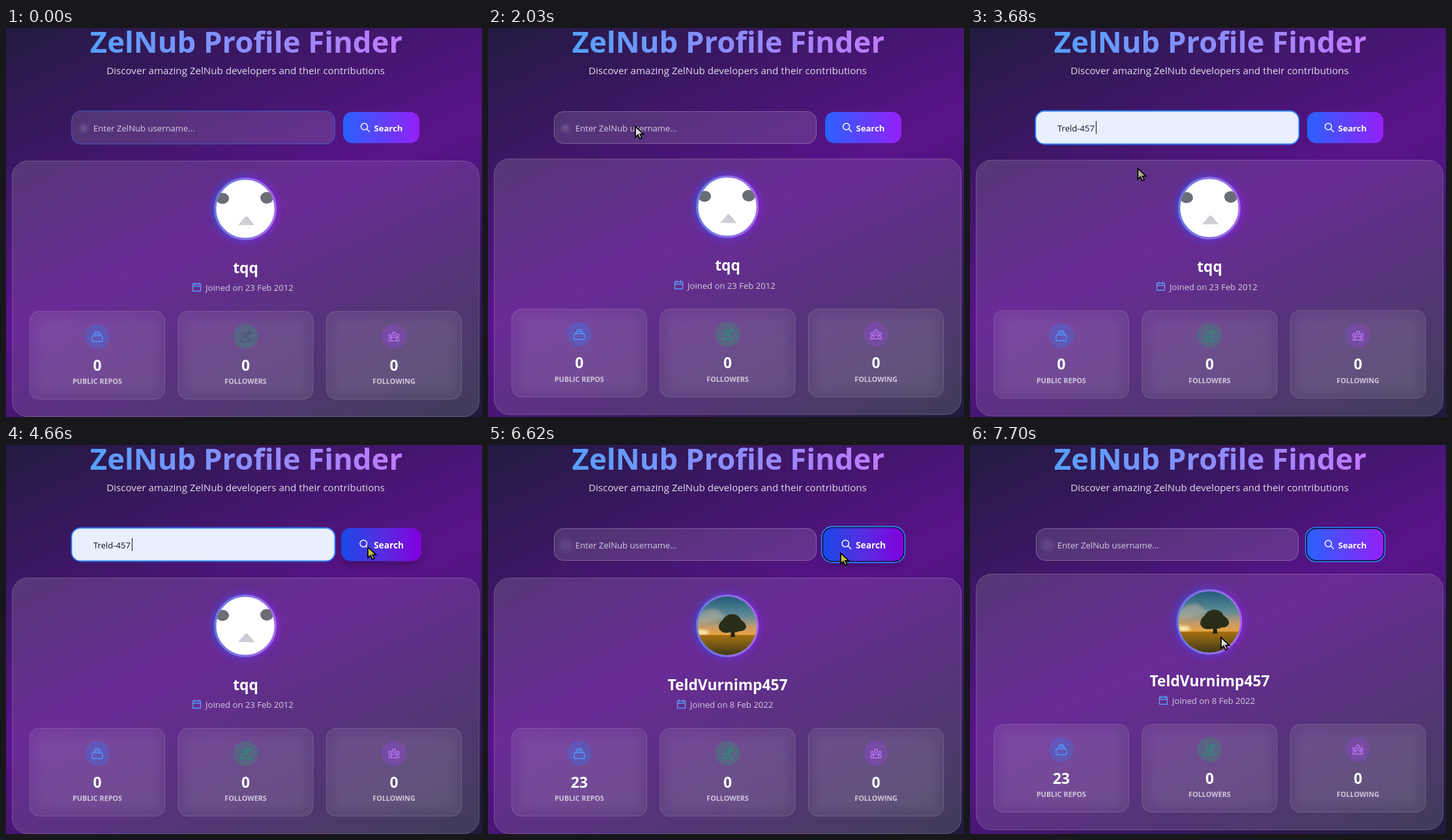
An HTML page for the animation above (8000 ms loop, 730 by 598 pixels).

```html
<!DOCTYPE html>
<html lang="en">
<head>
<meta charset="utf-8">
<title>Profile Finder</title>
<style>
  html, body { margin: 0; width: 100%; height: 100%; overflow: hidden; background: #211b40; }
  svg { display: block; font: 500 13.1px "Open Sans", "Noto Sans", sans-serif; }
  .mid { text-anchor: middle; }
  .bold { font-weight: 700; font-size: 22.8px; fill: #fff; }
  .label { font-weight: 700; font-size: 10.8px; fill: #d2c6dd; }
  .line { fill: none; stroke-linecap: round; stroke-linejoin: round; stroke-width: 1.4; }
</style>
</head>
<body>
<svg width="730" height="598" viewBox="0 0 730 598">
  <defs>
    <linearGradient id="page" gradientUnits="userSpaceOnUse" x2="349" y2="771">
      <stop stop-color="#221b41"/><stop offset=".5" stop-color="#59138b"/><stop offset="1" stop-color="#1f1c3d"/>
    </linearGradient>
    <linearGradient id="glass" gradientUnits="userSpaceOnUse" x2="349" y2="771">
      <stop offset=".2" stop-color="#fff" stop-opacity=".14"/>
      <stop offset=".5" stop-color="#fff" stop-opacity=".1"/>
      <stop offset=".9" stop-color="#fff" stop-opacity=".14"/>
    </linearGradient>
    <linearGradient id="title" gradientUnits="userSpaceOnUse" x1="128" x2="607">
      <stop stop-color="#55a0ff"/><stop offset="1" stop-color="#c07aff"/>
    </linearGradient>
    <linearGradient id="button">
      <stop stop-color="#2962fc"/><stop offset="1" stop-color="#9420f8"/>
    </linearGradient>
    <linearGradient id="buttonHover">
      <stop stop-color="#1a48e6"/><stop offset=".5" stop-color="#562ee2"/><stop offset="1" stop-color="#8200db"/>
    </linearGradient>
    <linearGradient id="ring">
      <stop stop-color="#6a78e0"/><stop offset="1" stop-color="#a468e8"/>
    </linearGradient>
    <linearGradient id="glow">
      <stop stop-color="#2b55f0"/><stop offset="1" stop-color="#9020f0"/>
    </linearGradient>
    <linearGradient id="sky" x2="0" y2="1">
      <stop stop-color="#1f5a78"/><stop offset=".5" stop-color="#5f8c98"/>
      <stop offset=".75" stop-color="#c09a6c"/><stop offset="1" stop-color="#eda23c"/>
    </linearGradient>
    <linearGradient id="field" x2="0" y2="1">
      <stop stop-color="#a8700f"/><stop offset=".4" stop-color="#7d5c16"/><stop offset="1" stop-color="#3c3612"/>
    </linearGradient>
    <filter id="blur" x="-30%" y="-30%" width="160%" height="160%"><feGaussianBlur stdDeviation="6"/></filter>
    <filter id="soft" x="-30%" y="-30%" width="160%" height="160%"><feGaussianBlur stdDeviation="2"/></filter>
    <clipPath id="disc"><circle r="45"/></clipPath>
  </defs>

  <rect width="730" height="598" fill="url(#page)"/>
  <text x="608" y="38" text-anchor="end" font-size="45.4" font-weight="700" fill="url(#title)">ZelNub Profile Finder</text>
  <text class="mid" x="367.5" y="71" font-size="15.15" font-weight="400" fill="#e2daea">Discover amazing ZelNub developers and their contributions</text>

  <rect id="field-box" x="101.5" y="128.5" width="402" height="49" rx="14"/>
  <circle id="blob" cx="119" cy="154" r="6.5" fill="#fff" fill-opacity=".13" filter="url(#soft)"/>
  <text id="entry" x="134" y="159"></text>
  <path id="caret" d="M193.5 143v20" stroke="#111"/>

  <g id="search">
    <rect id="shadow" x="-58" y="-16" width="116" height="48" rx="15" fill="#000" filter="url(#blur)"/>
    <rect id="gap" x="-60" y="-25.5" width="120" height="51" rx="15" fill="#080418"/>
    <rect id="halo" x="-60.8" y="-26.3" width="121.6" height="52.6" rx="16" fill="none" stroke="#2b8cff" stroke-width="1.5"/>
    <rect x="-58.5" y="-24" width="117" height="48" rx="14" fill="url(#button)"/>
    <rect id="dark" x="-58.5" y="-24" width="117" height="48" rx="14" fill="url(#buttonHover)"/>
    <g class="line" stroke="#fff"><circle cx="-26" cy="-1.5" r="5"/><path d="M-22.2 2.2l4.2 4.2"/></g>
    <text x="-11" y="5.5" font-weight="700" fill="#fff">Search</text>
  </g>

  <g id="card">
    <rect x="9.5" y="204.5" width="716" height="393" rx="23.5" fill="url(#glass)" stroke="#fff" stroke-opacity=".22"/>
    <g id="avatar">
      <circle r="50" fill="url(#glow)" filter="url(#blur)" opacity=".75"/>
      <circle r="46.3" fill="#fff" stroke="url(#ring)" stroke-width="3.4"/>
      <g id="face" clip-path="url(#disc)">
        <ellipse cx="-35" cy="-16" rx="10" ry="8.5" fill="#6b6d75"/>
        <ellipse cx="33" cy="-17" rx="10" ry="9" fill="#6b6d75"/>
        <path d="M-11 25L1 11L14 25z" fill="#cfcdd6"/>
        <path d="M1 11L14 25L4 15z" fill="#77747f"/>
      </g>
      <g id="scene" clip-path="url(#disc)">
        <path d="M-46-46h92v62h-92z" fill="url(#sky)"/>
        <path d="M-46-14q12-14 30-12q6 8 16 10q-16 10-46 14z" fill="#c4b39a" opacity=".5" filter="url(#soft)"/>
        <ellipse cx="-40" cy="10" rx="12" ry="4" fill="#ffe9b0" filter="url(#soft)"/>
        <path d="M-46 14h92v32h-92z" fill="url(#field)"/>
        <path d="M5 17l2-14h3l2 14z" fill="#1e2214"/>
        <path d="M-13 4q-1-8 6-13q5-9 14-9q11 0 14 9q8 5 8 11q-3 7-10 6q-8 4-16 2q-11 3-16-6z" fill="#292d18"/>
      </g>
    </g>
    <text id="name" class="mid bold" x="367.5" y="376.5"></text>
    <g id="joined">
      <path class="line" stroke="#5a9bf5" d="M-19.5-10.5h12v11h-12zM-19.5-7h12M-16.5-12.5v3M-10.5-12.5v3"/>
      <text fill="#d5cadf"></text>
    </g>
    <g id="stats"></g>
  </g>

  <g id="popup">
    <path d="M211 188l10-9l10 9z" fill="#1e1b19"/>
    <rect x="201.5" y="188.5" width="153" height="41" rx="5" fill="#35312e" stroke="#1e1b19" stroke-width="3.4"/>
    <text x="212" y="213.5" font-size="11.9" font-weight="600" fill="#eee7e0">Treld-457</text>
    <path class="line" stroke="#ddd6d0" d="M330 205l8 8m0-8l-8 8"/>
  </g>
  <path id="pointer" d="M0 0v16.5l4-3.6l2.8 6l3-1.4l-2.7-5.7h5.4z" stroke="#000" stroke-width="1.7"/>
</svg>

<script>
const $ = id => document.getElementById(id);
const set = (el, attrs) => { for (const k in attrs) el.setAttribute(k, attrs[k]); };
const show = (id, on) => $(id).style.display = on ? '' : 'none';

const icons = [
  ['PUBLIC REPOS', '#2b7fff', '#51a2ff', 'M-7 8h14q1 0 1-1v-5q0-3-3-3h-10q-3 0-3 3v5q0 1 1 1zM-6-1l2-3h8l2 3M-4-4l1-3h6l1 3'],
  ['FOLLOWERS', '#22a06a', '#22997a', 'M-8 8q1-7 7-7q6 0 8 7zM-4-1a3 3 0 1 1 4 1M0 0l7-7M3-7h5M8-3l-4-4'],
  ['FOLLOWING', '#9a40f0', '#c27aff', 'M-4 7q0-6 4-6t4 6zM-2.5-4a2.5 2.5 0 1 0 5 0a2.5 2.5 0 1 0-5 0M-5 7h-3q0-5 4-5M5 7h3q0-5-4-5M-8-1a2 2 0 1 0 4 0a2 2 0 1 0-4 0M4-1a2 2 0 1 0 4 0a2 2 0 1 0-4 0']
];
$('stats').innerHTML = icons.map(([label, tint, color, d], i) => `
  <g transform="translate(${140 + 227.5 * i} 0)">
    <rect x="-103.5" y="435.5" width="207" height="135" rx="14.5" fill="#fff" fill-opacity=".08" stroke="#fff" stroke-opacity=".16"/>
    <rect x="-92" y="447" width="184" height="112" rx="10" fill="#fff" fill-opacity=".05" filter="url(#blur)"/>
    <circle cy="474" r="19" fill="${tint}" fill-opacity=".28"/>
    <path class="line icon" transform="translate(0 474)" stroke="${color}" stroke-opacity=".85" d="${d}"/>
    <text class="mid bold count" y="526.5">0</text>
    <text class="mid label" y="547">${label}</text>
  </g>`).join('');
const greenIcon = document.querySelectorAll('.icon')[1];
const repoCount = document.querySelector('.count');
const joinedText = $('joined').querySelector('text');

// time, x, y, fill of the pointer
const path = [
  [830, 250, 600, '#aaa'], [1050, 285, 400, '#aaa'], [1310, 313, 236, '#aaa'], [1570, 290, 214, '#bbb'],
  [1840, 226, 152, '#ddd'], [2450, 226, 150, '#ddd'], [2700, 255, 216, '#eee'], [3200, 257, 216, '#a8b48c'],
  [3680, 257, 216, '#a8b48c'], [4080, 420, 196, '#c3c743'], [4460, 550, 160, '#c3c743'], [4660, 555, 157, '#c3c743'],
  [4800, 553, 155, '#c3c743'], [5150, 545, 147, '#c3c743'], [5400, 544, 150, '#c3c743'], [6000, 541, 166, '#cdc23e'],
  [6620, 541, 166, '#cdc23e'], [6860, 500, 200, '#ddd'], [7370, 385, 296, '#ddd'], [8000, 385, 296, '#ddd']
];

function draw(t) {
  const ramp = (a, b) => { const k = Math.min(1, Math.max(0, (t - a) / (b - a))); return k * k * (3 - 2 * k); };
  const within = (a, b) => t >= a && t < b;

  // profile card
  const lift = 6 * (ramp(950, 1380) - ramp(1840, 2250) + ramp(3610, 3850) - ramp(4060, 4440) + ramp(6900, 7350));
  const loaded = t >= 5900;
  set($('card'), { transform: `translate(0 ${-lift})` });
  set($('avatar'), { transform: `translate(367 278) scale(${1 + .045 * ramp(7380, 7680)})` });
  show('face', !loaded);
  show('scene', loaded);
  $('name').textContent = loaded ? 'TeldVurnimp457' : 'tqq';
  set($('joined'), { transform: `translate(${loaded ? 310 : 306} 404)` });
  joinedText.textContent = 'Joined on ' + (loaded ? '8 Feb 2022' : '23 Feb 2012');
  repoCount.textContent = loaded ? 23 : 0;
  set(greenIcon, { stroke: t < 830 ? '#465068' : t < 1840 ? '#14ad6e' : '#22997a' });

  // input
  const focused = within(2430, 5350), preview = within(2650, 3230), filled = within(3230, 5900);
  const grow = focused ? 1 : t < 70 ? .7 : 0;
  set($('field-box'), {
    x: 101.5 - grow, y: 128.5 - grow, width: 402 + 2 * grow, height: 49 + 2 * grow,
    fill: filled ? '#e8f0fe' : '#fff', 'fill-opacity': filled ? 1 : focused ? .19 : .12,
    stroke: focused ? '#2b7fff' : t < 70 ? '#3f60c4' : '#fff',
    'stroke-opacity': focused || t < 70 ? 1 : .27, 'stroke-width': focused ? 1.8 : 1
  });
  show('blob', !filled);
  set($('blob'), { r: focused || loaded ? 10 : 6.5, 'fill-opacity': focused || loaded ? .08 : .13 });
  $('entry').textContent = preview || filled ? 'Treld-457' : 'Enter ZelNub username...';
  $('entry').style.cssText = preview ? 'font: 11px "Liberation Sans", Arial, sans-serif' : '';
  set($('entry'), { fill: filled ? '#15151c' : preview ? '#fff' : '#d6cce0' });
  show('caret', within(3350, 5350) && Math.floor((t - 3350) / 530) % 2 === 0);
  show('popup', within(2520, 3290));

  // button
  const hover = ramp(4480, 4650) - ramp(6650, 6850);
  set($('search'), { transform: `translate(575.5 153) scale(${1 + .05 * hover})` });
  set($('dark'), { opacity: hover });
  set($('shadow'), { opacity: .2 * hover });
  show('gap', t >= 5350);
  show('halo', t >= 5350);

  // pointer
  show('pointer', t >= 830);
  const i = path.findIndex(p => p[0] > t);
  if (i > 0) {
    const [a, x, y, fill] = path[i - 1], [b, x2, y2] = path[i], k = (t - a) / (b - a);
    set($('pointer'), { transform: `translate(${x + (x2 - x) * k} ${y + (y2 - y) * k})`, fill });
  }
}

const start = performance.now();
(function frame() {
  draw((performance.now() - start) % 8000);
  requestAnimationFrame(frame);
})();
</script>
</body>
</html>
```
